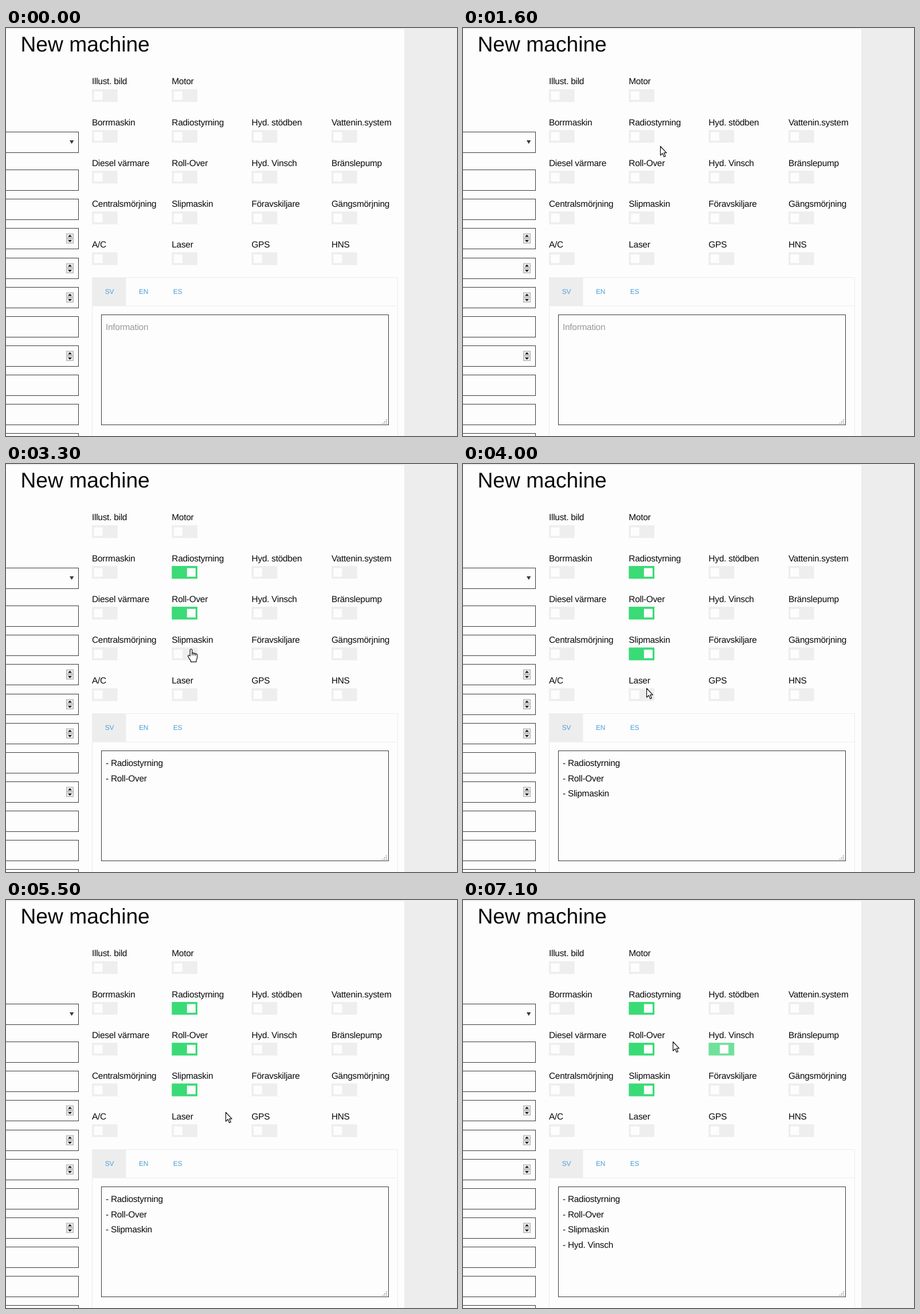
Animation, 787 px wide and 712 px high, one loop 7200 ms. Source, as an HTML page:

```html
<!DOCTYPE html>
<html lang="sv">
<head>
<meta charset="utf-8">
<title>New machine</title>
<style>
html, body { margin: 0; width: 100%; height: 100%; overflow: hidden; background: #ededed; }
svg { display: block; }
text { font: 15.4px "Liberation Sans", Arial, sans-serif; letter-spacing: -.25px; fill: #0a0a0a; text-rendering: geometricPrecision; white-space: pre; }
.title { font-size: 37.2px; letter-spacing: 0; }
.tab { font-size: 12px; fill: #4a9fd8; text-anchor: middle; }
.hint { fill: #999; }
.field { fill: #fdfdfd; stroke: #3c3c3c; }
.pale { fill: none; stroke: #ececec; }
.cursor { fill: #fff; stroke: #111; stroke-width: 1.2; stroke-linejoin: round; }
</style>
</head>
<body>
<svg id="stage" width="787" height="712" viewBox="0 0 787 712"></svg>
<script>
const LOOP = 7200, STEP = 100;
const stage = document.getElementById('stage');

function add(tag, attrs, parent = stage) {
  const el = document.createElementNS('http://www.w3.org/2000/svg', tag);
  for (const key in attrs) el.setAttribute(key, attrs[key]);
  parent.appendChild(el);
  return el;
}
const rect = (x, y, width, height, extra) => add('rect', { x, y, width, height, ...extra });
const path = (d, extra, parent) => add('path', { d, ...extra }, parent);
function label(x, y, str, cls = '') {
  const el = add('text', { x, y, class: cls });
  el.textContent = str;
  return el;
}

// Page
rect(0, 2, 695, 710, { fill: '#fdfdfd' });
label(25.5, 41, 'New machine', 'title');

// Left column of inputs
function spinner(y) {
  for (const [top, dir] of [[y - 8.5, -1], [y + 0.5, 1]]) {
    rect(105.5, top + 0.5, 12, 7.5, { fill: '#e6e6e6', stroke: '#acacac' });
    const mid = top + 4.2;
    path(`M108.1 ${mid - dir * 1.8}h6.8l-3.4 ${dir * 3.8}z`, { fill: '#111' });
  }
}
const input = y => rect(-10.5, y, 137, 36, { class: 'field' });
input(181.5);
path('M111 196h7.4l-3.7 6.2z', { fill: '#3a3a3a' });
for (let i = 0; i < 10; i++) {
  const y = Math.round(248.1 + i * 51.15) - 0.5;
  input(y);
  if ([2, 3, 4, 6].includes(i)) spinner(y + 17.5);
}

// Switches
const rows = [
  ['Illust. bild', 'Motor'],
  ['Borrmaskin', 'Radiostyrning', 'Hyd. stödben', 'Vattenin.system'],
  ['Diesel värmare', 'Roll-Over', 'Hyd. Vinsch', 'Bränslepump'],
  ['Centralsmörjning', 'Slipmaskin', 'Föravskiljare', 'Gängsmörjning'],
  ['A/C', 'Laser', 'GPS', 'HNS']
];
const switches = [];
rows.forEach((row, r) => row.forEach((name, c) => {
  const x = 150 + c * 139.3, y = 106.8 + r * 71.15;
  label(x, y - 8.4, name);
  const track = rect(x, y, 44.7, 22.3);
  const knob = rect(0, y + 3.7, 15, 15, { fill: '#fdfdfd' });
  switches.push({ name, x, y, track, knob });
}));

// Tabs and text area
rect(150.5, 435.5, 533, 300, { class: 'pale' });
path('M151 485h532', { class: 'pale' });
rect(151, 436, 58.5, 49, { fill: '#ededed' });
['SV', 'EN', 'ES'].forEach((name, i) => label(180.5 + i * 59.5, 464, name, 'tab'));
rect(166.5, 500.5, 501, 192, { class: 'field' });
for (let i = 0; i < 3; i++)
  for (let j = 0; j <= i; j++)
    rect(663 - j * 3, 683 + i * 3, 1.5, 1.5, { fill: '#888' });

const hint = label(174, 527, 'Information', 'hint');
const lines = [0, 1, 2, 3].map(i => label(174, 527 + i * 26.7, ''));

// Pointer shapes, hot spot at 0,0
const pointer = add('g', { class: 'cursor' });
const arrow = path('M.5 .5V16.2L4.2 12.8L6.8 18.8L9.3 17.7L6.7 11.8H11.2Z', {}, pointer);
const hand = add('g', {}, pointer);
path('M-1.8 12V1.8Q-1.8 0 0 0T1.8 1.8V7.2Q3 5.9 4.8 7.4Q6.3 6.6 7.6 8.3Q10.6 7.7 10.6 10.6V15Q10.6 17 9 19V22.3H-.5V20.2Q-3.2 17.6-4.9 13.6Q-6 11.6-4.9 11Q-3.6 10.2-1.8 12Z', {}, hand);
path('M1.8 7V11M4.8 7.6V11M7.6 8.4V11.5', { fill: 'none' }, hand);

// Pointer route: time, x, y
const route = [
  [300, 763, 556], [800, 355, 222], [1300, 352, 214], [2200, 320, 182], [2500, 320, 182],
  [2700, 321, 256], [3000, 321, 258], [3300, 323, 323], [3700, 323, 326],
  [4100, 319, 403], [4600, 319, 408], [5300, 319, 408], [5700, 447, 331],
  [6100, 447, 329], [6400, 447, 329], [6800, 446, 257], [6900, 446, 257],
  [7000, 438, 256], [7100, 366, 247]
];
const clicks = [
  [2400, 'Radiostyrning'], [2800, 'Roll-Over'], [3500, 'Slipmaskin'],
  [4300, 'Laser'], [5100, 'Laser'], [5800, 'Föravskiljare'],
  [6200, 'Föravskiljare'], [7000, 'Hyd. Vinsch']
];
const slide = [0.3, 0.7, 0.94, 1];
const mix = (a, b, p) => a + (b - a) * p;
const ease = p => p * p * (3 - 2 * p);

function place(t) {
  if (t < route[0][0]) return null;
  const i = route.findIndex(k => k[0] >= t);
  if (i < 1) return route[Math.max(i, 0)].slice(1);
  const [t0, x0, y0] = route[i - 1], [t1, x1, y1] = route[i];
  const p = ease((t - t0) / (t1 - t0));
  return [mix(x0, x1, p), mix(y0, y1, p)];
}

function drawSwitches(t) {
  const chosen = [];
  const level = {};
  for (const [at, name] of clicks) {
    if (t < at) break;
    const p = slide[Math.min((t - at) / STEP, slide.length - 1)];
    const k = chosen.indexOf(name);
    if (k < 0) chosen.push(name); else chosen.splice(k, 1);
    level[name] = k < 0 ? p : 1 - p;
  }
  for (const s of switches) {
    const p = level[s.name] || 0;
    const rgb = [[238, 58], [238, 219], [238, 118]].map(([a, b]) => Math.round(mix(a, b, p)));
    s.track.setAttribute('fill', `rgb(${rgb})`);
    s.knob.setAttribute('x', s.x + mix(3.5, 26.5, p));
  }
  hint.style.display = chosen.length ? 'none' : '';
  lines.forEach((el, i) => { el.textContent = chosen[i] ? '- ' + chosen[i] : ''; });
}

function drawPointer(t) {
  const pos = place(t);
  pointer.style.display = pos ? '' : 'none';
  if (!pos) return;
  const [x, y] = pos.map(Math.round);
  const over = switches.some(s => x >= s.x && x < s.x + 45 && y >= s.y && y < s.y + 22);
  arrow.style.display = over ? 'none' : '';
  hand.style.display = over ? '' : 'none';
  pointer.setAttribute('transform', `translate(${x} ${y})`);
}

function frame() {
  const t = Math.floor(performance.now() % LOOP / STEP) * STEP;
  drawSwitches(t);
  drawPointer(t);
  requestAnimationFrame(frame);
}
frame();
</script>
</body>
</html>
```
